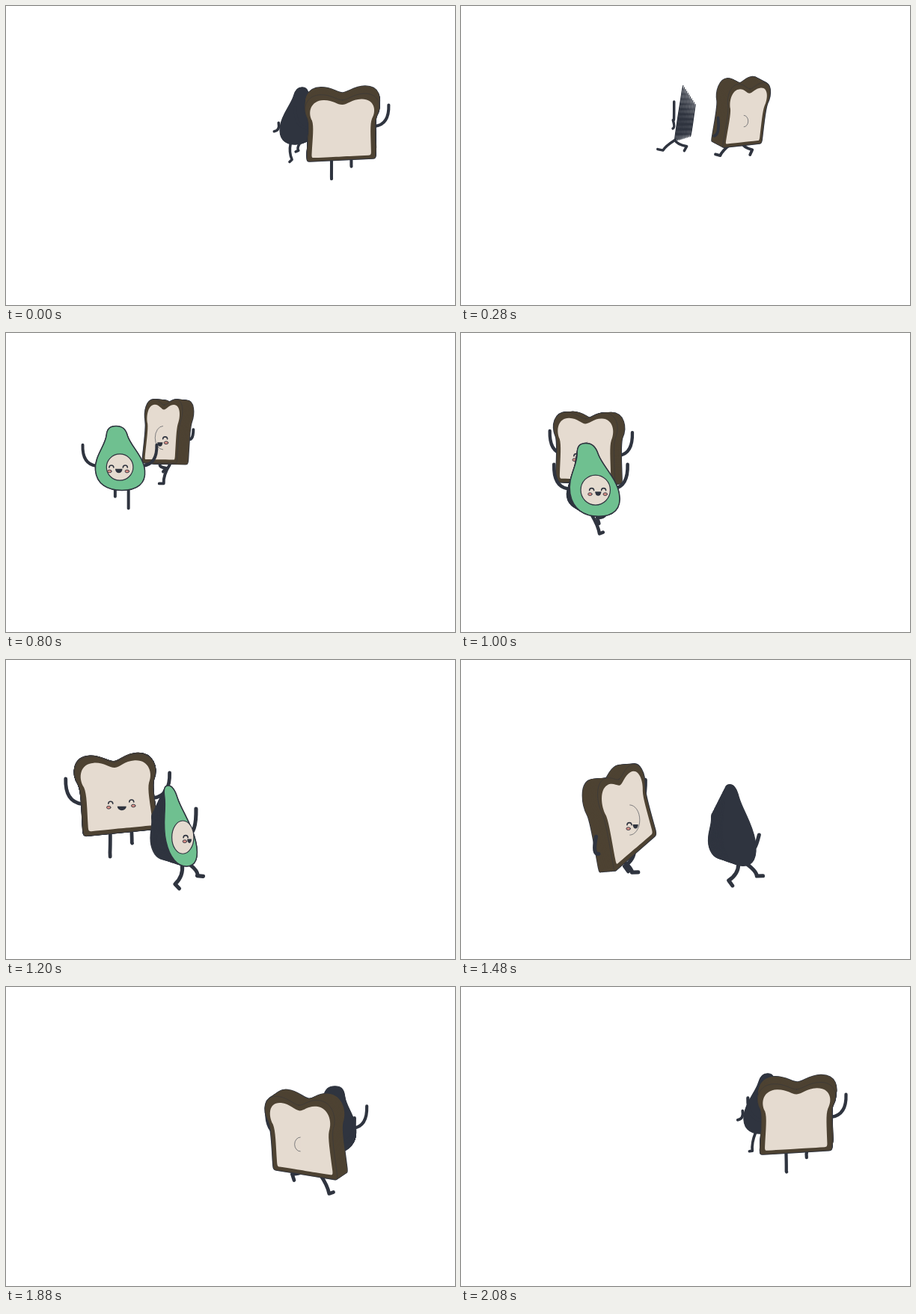
Recreate the animation shown at these times as an HTML page with a canvas. Size 600 by 400 pixels, loop 2120 ms.

```html
<!DOCTYPE html>
<html lang="en">
<head>
<meta charset="utf-8">
<title>Snack chase</title>
<style>
html, body { margin: 0; width: 100%; height: 100%; overflow: hidden; background: #fff; }
canvas { display: block; }
</style>
</head>
<body>
<canvas id="stage" width="600" height="400"></canvas>
<script>
const ctx = document.getElementById('stage').getContext('2d');
const { sin, cos, abs, min, max, sign, PI } = Math;
const LOOP = 2120, RAD = PI / 180;
const INK = '#2f343f', CRUST = '#4d4232', CREAM = '#e5dbd0', GREEN = '#6fc090', BLUSH = '#dc8f86';

// Key points of the run: x, y, heading in degrees (0 faces the viewer, 90 faces right)
const TIMES = [0, 520, 800, 1200, 1480, 1720, 2080];
const toast = {
  path: [[449, 157, -181], [305.5, 132, -84], [216, 132, -56], [148.4, 178.6, 2],
    [211, 205, 59], [351.6, 210, 115], [448.7, 170, 177]],
  shoulder: [.9, .2], hip: 1.03, hang: .58, drop: .78,
  shape: toastShape, draw: drawToast
};
const pear = {
  path: [[391, 147, -141], [211.5, 146, -48], [151, 167.5, 0], [229, 222, 62],
    [368, 221, 121], [444, 195, 180], [405, 156, 216]],
  shoulder: [.95, .24], hip: .96, hang: .3, drop: .62,
  shape: pearShape, draw: drawPear
};

// Smooth closed curve through the key points, one full turn per loop
function along(path, t) {
  const n = path.length;
  const lap = i => Math.floor(i / n), at = i => (i + n) % n;
  const time = i => TIMES[at(i)] + LOOP * lap(i);
  const value = (i, k) => path[at(i)][k] + (k === 2 ? 360 * lap(i) : 0);
  const slope = (i, k) => (value(i + 1, k) - value(i - 1, k)) / (time(i + 1) - time(i - 1));
  let i = n - 1;
  while (t < TIMES[i]) i--;
  const h = time(i + 1) - time(i), s = (t - time(i)) / h, r = 1 - s;
  return [0, 1, 2].map(k =>
    r * r * (1 + 2 * s) * value(i, k) + s * s * (3 - 2 * s) * value(i + 1, k) +
    h * s * r * (r * slope(i, k) - s * slope(i + 1, k)));
}

// Sizes grow towards the viewer, that is with y
function toastShape({ y, c, s, tilt }) {
  const base = 43 + .18 * (y - 140), w = 1.06 * base;
  return { w, h: base + 2 * c, dx: .43 * base * s, dy: 5.5 * c - 4.5, ay: -w * tilt * (y - 130) / 200 };
}

function pearShape({ y, s }) {
  const h = 38.5 + .225 * (y - 147);
  return { w: .765 * h, h, dx: .53 * h * s, dy: 0, ay: 0 };
}

function poseOf(who, t) {
  const [x, y, deg] = along(who.path, t);
  const yaw = deg * RAD, c = cos(yaw), s = sin(yaw);
  const tilt = sin(yaw + .3), lean = .035 + .19 * tilt;
  const p = { x, y, yaw, c, s, tilt };
  Object.assign(p, who.shape(p));
  p.ax = p.w * c;
  p.bx = p.h * sin(lean);
  p.by = p.h * cos(lean);
  p.front = p.ax * p.by > p.ay * p.bx;
  // Body point: u across, v down, k from back to front
  p.at = (u, v, k) => [
    x + u * p.ax + v * p.bx + k * p.dx,
    y + u * p.ay * (1 + .25 * v) + v * p.by + k * p.dy
  ];
  return p;
}

// Right halves, from the top middle down to the bottom middle
const SLICE = [[0, -.82], [.15, -.82, .3, -1, .6, -1], [1, -1, 1.1, -.6, .95, -.3],
  [.88, -.1, .92, .3, .94, .88], [.94, .97, .93, 1, .86, 1], [.5, 1, .2, 1, 0, 1]];
const DROP = [[0, -1], [.25, -1, .38, -.92, .43, -.7], [.52, -.38, 1, -.05, 1, .38],
  [1, .8, .6, 1, 0, 1]];

function outline(half, map) {
  ctx.beginPath();
  ctx.moveTo(...map(...half[0]));
  const curve = (p, m) => ctx.bezierCurveTo(
    ...map(m * p[0], p[1]), ...map(m * p[2], p[3]), ...map(m * p[4], p[5]));
  half.slice(1).forEach(p => curve(p, 1));
  for (let i = half.length - 1; i > 0; i--) {
    const p = half[i], end = half[i - 1].slice(-2);
    curve([p[2], p[3], p[0], p[1], ...end], -1);
  }
  ctx.closePath();
}

function paint(fill, stroke, width) {
  if (fill) { ctx.fillStyle = fill; ctx.fill(); }
  if (stroke) { ctx.strokeStyle = stroke; ctx.lineWidth = width; ctx.stroke(); }
}

function ellipse(x, y, rx, ry, from = 0, to = 2 * PI) {
  ctx.beginPath();
  ctx.ellipse(x, y, rx, ry, 0, from, to);
}

// Smile, arched eyes and cheeks; the far side hides on a turned head
function face(x, y, sx, size, slope, turn) {
  const gap = 14 * size * sx;
  for (const side of [-1, 1]) {
    if (abs(turn) > .6 && side === sign(turn)) continue;
    const ex = x + side * gap, ey = y + side * gap * slope;
    ellipse(ex, ey + 1.5, 3, 3, PI, 2 * PI);
    paint(null, INK, 1.6);
    ellipse(ex + side * 2.5 * sx, ey + 6.5, 2.8, 1.9);
    paint(BLUSH, INK, .9);
  }
  ellipse(x + size, y + 8 * size - 2, 6 * max(.6, sx) * (.4 + .6 * size), 5.5, 0, PI);
  ctx.closePath();
  paint(INK);
}

function drawToast(p) {
  const near = p.front ? .5 : -.5;
  const plate = (k, scale = 1) => (u, v) =>
    p.at(u * scale, v * scale + (scale < 1 ? .03 : 0), k);
  for (const [fill, line] of [[null, INK], [CRUST, null]]) {
    for (let i = -6; i <= 6; i++) {
      outline(SLICE, plate(near * i / 6));
      paint(fill, line, 1.5);
    }
  }
  outline(SLICE, plate(near));
  paint(null, 'rgba(47,52,63,.5)', .8);
  outline(SLICE, plate(near, .865));
  paint(CREAM);

  const [fx, fy] = p.at(.07, .21, near);
  if (abs(p.s) > .45) {
    const start = (p.s > 0) === p.front ? -PI / 2 : PI / 2;
    const flat = p.front ? 1 : .5;
    ellipse(fx, fy, (.25 * abs(p.ax) + .28 * abs(p.dx)) * flat, p.by * .37 * flat, start, start + PI);
    paint(CREAM, 'rgba(47,52,63,.7)', .8);
  }
  if (p.front) face(fx + .32 * p.dx, fy, max(.35, p.c), 1, p.ay / max(p.ax, 12), p.dx / max(p.ax, 1));
}

function drawPear(p) {
  // The back is a dome of shrinking slices
  const shell = k => (u, v) => p.at(u * (1 - .25 * k), .6 + (v - .6) * (1 - .42 * k), -k);
  for (let i = 10; i >= 0; i--) {
    outline(DROP, shell(i / 10));
    paint(INK, INK, 1.2);
  }
  if (!p.front) return;
  outline(DROP, shell(0));
  paint(GREEN, INK, 1.5);

  const [px, py] = p.at(0, .28, .15);
  ctx.save();
  ellipse(px, py, .54 * p.ax + .15 * abs(p.dx), .41 * p.by);
  paint(CREAM, INK, 1.2);
  ctx.clip();
  face(px + .35 * p.dx - 2 * p.c, py - 1, max(.4, p.c), .66, 0, p.dx / max(p.ax, 1));
  ctx.restore();
}

function limb(p, [x, y], bend, end, tip) {
  const to = ([dx, dy]) => [x + dx * p.h, y + dy * p.h];
  ctx.beginPath();
  ctx.moveTo(x, y);
  ctx.quadraticCurveTo(...to(bend), ...to(end));
  if (tip) ctx.lineTo(...to(tip));
  paint(null, INK, .092 * p.h);
}

// Arms wave, and hang down on the side turned to the viewer
function arm(who, p, side, down) {
  const [u, v] = who.shoulder;
  const out = side * p.c;
  const mix = (a, b) => a + (b - a) * down;
  limb(p, p.at(side * u, v, p.front ? -.3 : .3),
    [mix(out * .44, -.08 * p.s), mix(-.06, who.hang * .9)],
    [mix(out * .42, .2 * p.c), mix(-.65, who.hang)]);
}

// One running leg: swing goes forward and back, the rear foot kicks up
function leg(who, p, side, step) {
  const swing = sin(step), lift = .3 * (1 + cos(step)) + .5 * max(0, -swing);
  const end = [.45 * p.s * swing, .62 * (1 - lift)];
  const bend = [end[0] / 2 + .14 * p.s, end[1] / 2 + .04];
  const tip = [end[0] + .14 * p.s * (1 + .4 * swing), end[1] + .12 * (.5 - .9 * swing)];
  limb(p, p.at(side * .27, who.hip, 0), bend, end, tip);
}

function drawFigure(who, p, t) {
  // Steps slow down along the near side of the track
  const turn = 2 * PI * t / LOOP;
  const step = .17 + 5 * turn - 2.6 * max(0, -sin(turn + .35));
  leg(who, p, -1, step);
  leg(who, p, 1, step + PI);
  const arms = [-1, 1].map(side => {
    const s = min(1, max(0, (sin(-side * p.yaw - .1) - who.drop + .04) / .08));
    return [side, s * s * (3 - 2 * s)];
  });
  arms.filter(a => a[1] < .5).forEach(a => arm(who, p, ...a));
  who.draw(p);
  arms.filter(a => a[1] >= .5).forEach(a => arm(who, p, ...a));
}

function render(now) {
  const t = now % LOOP, r = t % 200;
  const held = t - r + (r >= 120 ? 120 : r >= 80 ? 80 : 0);
  ctx.fillStyle = '#fff';
  ctx.fillRect(0, 0, 600, 400);
  [toast, pear]
    .map(who => [who, poseOf(who, held)])
    .sort((a, b) => a[1].y - b[1].y)
    .forEach(([who, pose]) => drawFigure(who, pose, held));
}

ctx.lineCap = ctx.lineJoin = 'round';
let began;
function tick(now) {
  began ??= now;
  render(now - began);
  requestAnimationFrame(tick);
}
render(0);
requestAnimationFrame(tick);
</script>
</body>
</html>
```
